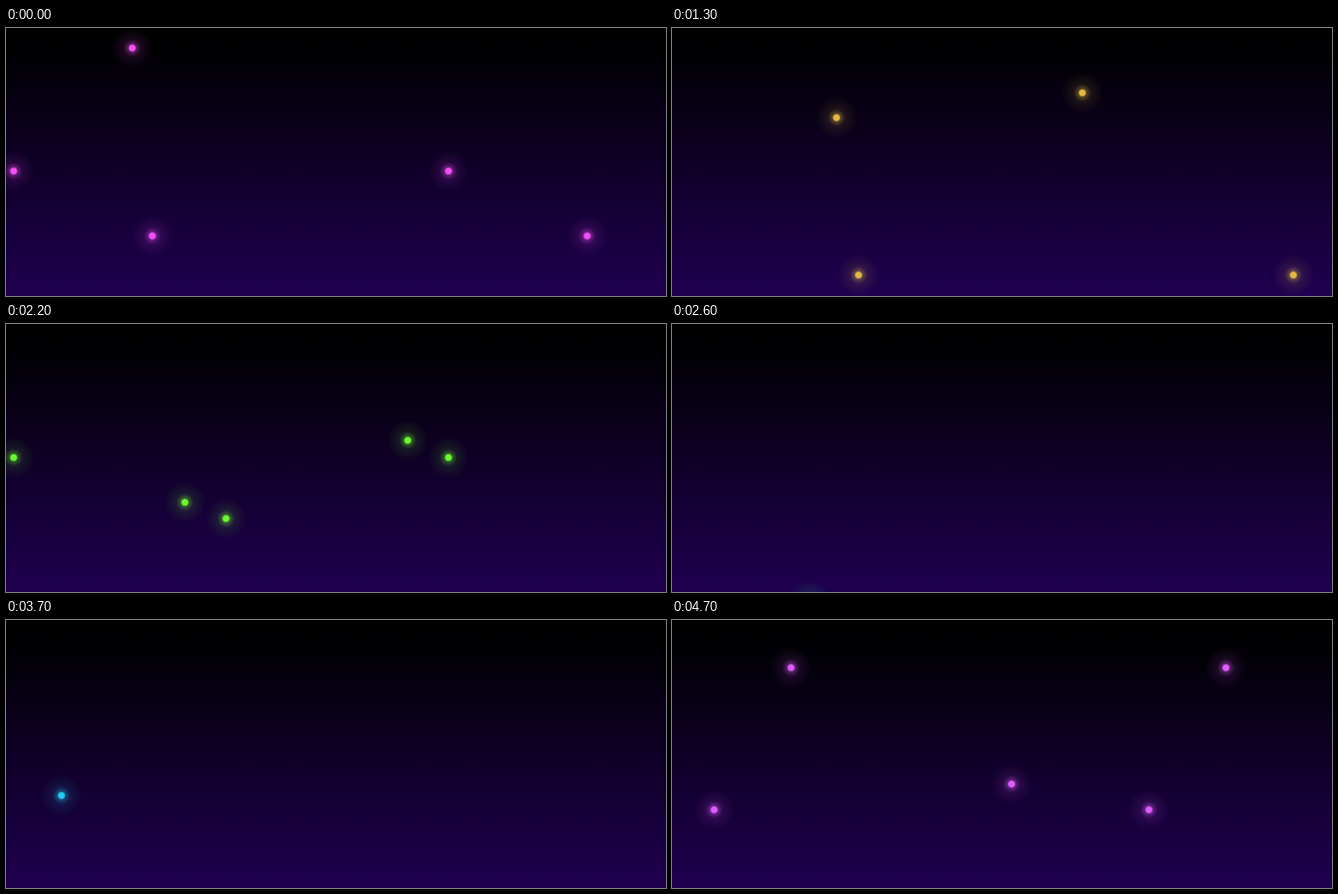
An HTML page with a canvas for the animation above (4.8 s loop, 690 by 281 pixels).

```html
<!DOCTYPE html>
<html lang="en">
<head>
<meta charset="utf-8">
<title>Falling lights</title>
<style>
  html, body { margin: 0; width: 100%; height: 100%; overflow: hidden; background: #000; }
  canvas { display: block; }
</style>
</head>
<body>
<canvas id="stage" width="690" height="281"></canvas>
<script>
const W = 690, H = 281;
const STEP = 100, STEPS = 48;
const TILE = 454.6;             // spacing of the repeated lights
const FALL = 168, DRIFT = 28.5; // movement per step
const ECHO = 3, SHIFT = 150;    // each light is followed by another, later and shifted

const ctx = document.getElementById('stage').getContext('2d');

// Every light falls along a straight line through one key point: [step, x, y].
const single = [
  [0, 132, 21], [7, 57, 50], [13, 172, 94], [13, 429, 68],
  [22, 187, 187], [22, 420, 122], [22, 230, 204],
  [30, 207, 184], [30, 107, 249], [37, 58, 184], [47, 355, 172]
];
const tiled = [
  [0, 8, 150], [0, 153, 218], [7, 14, 245], [7, 46, 254],
  [13, 195, 259], [22, 8, 140], [47, 44, 199]
];

const sky = ctx.createLinearGradient(0, 0, 0, H);
sky.addColorStop(0, '#000');
sky.addColorStop(0.1, '#010004');
sky.addColorStop(1, '#1f0050');

// A full turn of the hue, quicker through the warm colours.
function colorAt(turn) {
  const a = 2 * Math.PI * turn;
  const light = 0.79 - 0.08 * Math.cos(a);
  const chroma = 0.2 + 0.065 * Math.cos(2 * a);
  const hue = (327 + 360 * turn + 25 * Math.sin(a)) % 360;
  return alpha => `oklch(${light} ${chroma} ${hue} / ${alpha})`;
}

function glow(x, y, color) {
  const r = 22;
  const g = ctx.createRadialGradient(x, y, 0, x, y, r);
  g.addColorStop(0.13, color(1));
  g.addColorStop(0.2, color(0.36));
  g.addColorStop(0.42, color(0.1));
  g.addColorStop(1, color(0));
  ctx.fillStyle = g;
  ctx.fillRect(x - r, y - r, 2 * r, 2 * r);
}

// Signed distance in steps, the short way round the loop.
const stepsSince = (now, then) =>
  (now - then + 1.5 * STEPS) % STEPS - STEPS / 2;

function drawLights(points, step, color, copies) {
  for (const [at, x, y] of points) {
    for (const echo of [0, 1]) {
      const d = stepsSince(step, at + echo * ECHO);
      const x0 = (x + echo * SHIFT) % TILE + DRIFT * d;
      for (let i = 0; i < copies; i++) glow(x0 + i * TILE, y + FALL * d, color);
    }
  }
}

function draw(ms) {
  const step = Math.floor(ms / STEP) % STEPS;
  const color = colorAt(step / STEPS);
  ctx.fillStyle = sky;
  ctx.fillRect(0, 0, W, H);
  drawLights(single, step, color, 1);
  drawLights(tiled, step, color, 2);
}

const start = performance.now();
function tick() {
  draw(performance.now() - start);
  requestAnimationFrame(tick);
}
tick();
</script>
</body>
</html>
```
